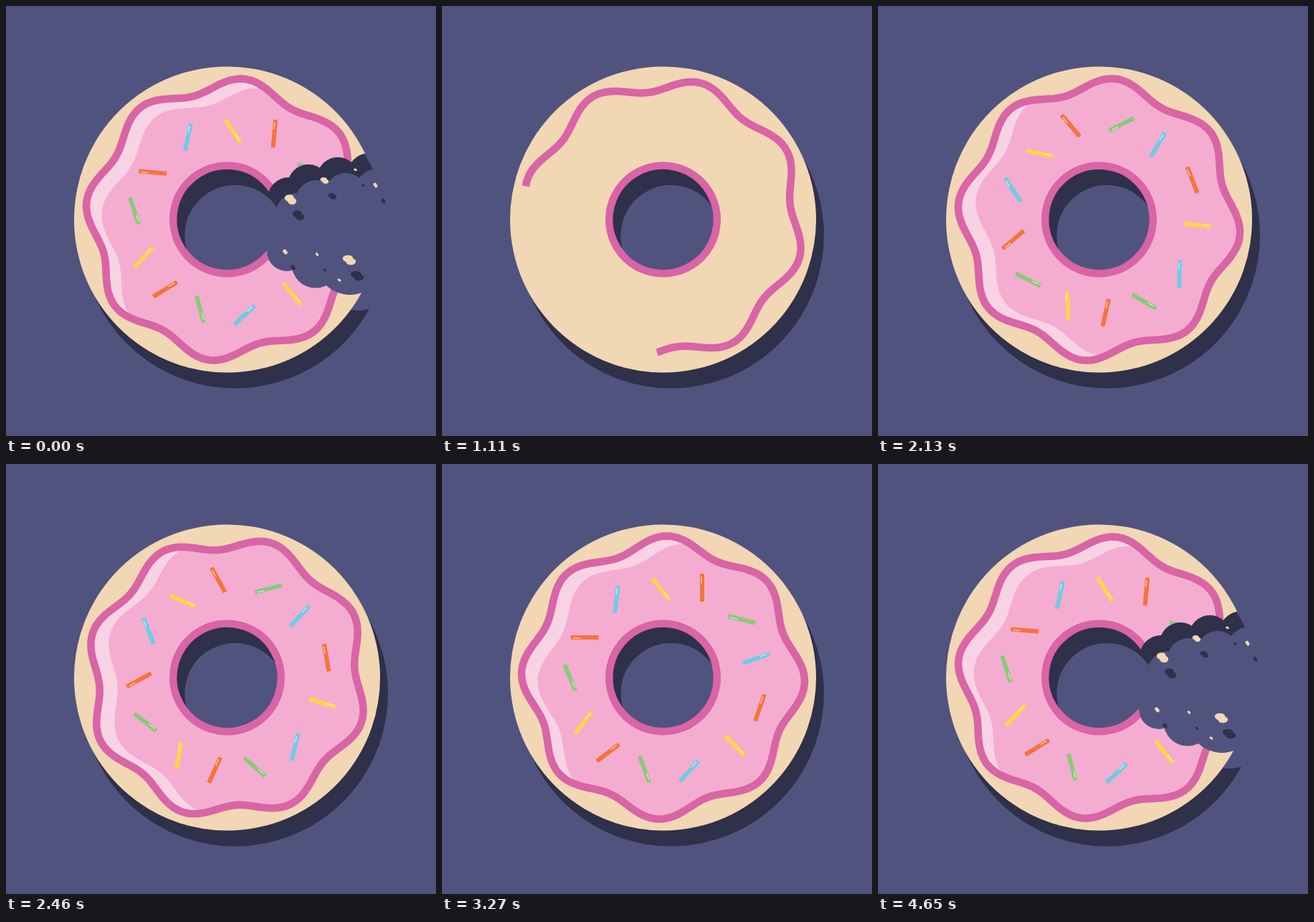
These frames come from a looping animation (600x600 px, 4.68 s). An HTML page:

```html
<!DOCTYPE html>
<html lang="en">
<head>
<meta charset="utf-8">
<title>Donut</title>
<style>
  html, body { margin: 0; width: 100%; height: 100%; overflow: hidden; background: #51537f; }
  svg { display: block; width: 100vw; height: 100vh; }
  #donut { filter: drop-shadow(11px 22px 0.6px #2f304a); }
  .line { fill: none; stroke: #d964a6; stroke-width: 10.5; }
</style>
</head>
<body>
<svg viewBox="0 0 600 600">
  <defs>
    <clipPath id="icingClip"><path id="icingShape"/></clipPath>
    <mask id="biteMask" maskUnits="userSpaceOnUse" x="0" y="0" width="600" height="600">
      <rect width="600" height="600" fill="#fff"/>
      <g id="bites"></g>
    </mask>
  </defs>
  <rect width="600" height="600" fill="#51537f"/>
  <g id="donut">
    <g mask="url(#biteMask)">
      <g transform="translate(308.5 298)">
        <circle id="dough" r="143.5" fill="none" stroke="#f2d7b4" stroke-width="140" pathLength="1" transform="rotate(-80.7)"/>
        <g id="icing">
          <g clip-path="url(#icingClip)">
            <circle id="fill" fill="none" stroke="#f4add0"/>
            <path id="shine" fill="#f8d3e4" fill-rule="evenodd"/>
          </g>
          <g id="sprinkles"></g>
          <path id="rim" class="line" pathLength="1"/>
          <circle id="hole" class="line" r="75.25" pathLength="1" transform="rotate(-90)"/>
        </g>
      </g>
    </g>
    <g id="crumbs" fill="#f2d7b4"></g>
  </g>
</svg>
<script>
const LOOP = 4680, STEP = 30;
const SPIN = 35.35, SPIN_END = 3420, SPIN_REF = 3270;
const $ = id => document.getElementById(id);
const RAD = Math.PI / 180;

function add(parent, tag, attrs) {
  const el = document.createElementNS("http://www.w3.org/2000/svg", tag);
  for (const key in attrs) el.setAttribute(key, attrs[key]);
  parent.appendChild(el);
  return el;
}

const phase = (t, from, to) => Math.min(1, Math.max(0, (t - from) / (to - from)));
const easeInOut = p => p * p * (3 - 2 * p);
const easeOut = p => 1 - (1 - p) ** 3;

// Eight-lobed icing outline, angles clockwise from the top
function wavy(dx = 0, dy = 0) {
  let d = "";
  for (let a = 0; a < 360; a += 1.5) {
    const r = 188 + 9.6 * Math.cos(8 * (a - 2) * RAD);
    const x = dx + r * Math.sin(a * RAD), y = dy - r * Math.cos(a * RAD);
    d += (a ? "L" : "M") + x.toFixed(2) + " " + y.toFixed(2);
  }
  return d + "Z";
}

const outline = wavy();
$("icingShape").setAttribute("d", outline);
$("rim").setAttribute("d", outline);

const ORANGE = "#f4743b", GREEN = "#8cc87a", BLUE = "#6fcbe4", YELLOW = "#fdd34c";
// x, y, direction of the glossy end, colour
const sprinkles = [
  [363, 172.5, -90, ORANGE], [418.5, 217, 194, GREEN], [438.5, 271.5, -19, BLUE],
  [443.5, 340, -71, ORANGE], [408.5, 393, 46, YELLOW], [345, 428.5, -48, BLUE],
  [282.5, 426, 70, GREEN], [231.5, 403, -37, ORANGE], [197.5, 361, -52, YELLOW],
  [178.5, 298, 67, GREEN], [199, 242, 180, ORANGE], [243.5, 188.5, -83, BLUE],
  [305, 174.5, 52, YELLOW]
].map(([x, y, dir, color]) => {
  const el = add($("sprinkles"), "g", {});
  add(el, "rect", { x: -19.5, y: -3, width: 39, height: 6, rx: 0.8, fill: color });
  add(el, "path", { d: "M6-1H16", stroke: "#fff", "stroke-opacity": 0.65, "stroke-width": 1.3 });
  return { el, place: `translate(${x - 308.5} ${y - 298}) rotate(${dir})` };
});

// Each bite: start time, body polygon, circles (x, y, r)
const bites = [
  [3480, "455,240 506,235 560,222 560,390 480,380 450,362", [[463, 240, 29], [506, 235, 29.5], [480, 355, 48]]],
  [3570, "415,250 470,240 485,360 425,360", [[422, 250, 29], [432, 360, 33.5]]],
  [3660, "367,262 430,250 445,360 392,350 366,335", [[395, 269, 30], [392, 342, 28]]]
].map(([start, points, circles]) => {
  const el = add($("bites"), "g", {});
  add(el, "polygon", { points });
  for (const [cx, cy, r] of circles) add(el, "circle", { cx, cy, r });
  return { el, start };
});

// x, y, half width, half height
const crumbs = [
  [397, 270, 8, 7], [444.5, 243.5, 5.8, 4.6], [479, 354.5, 9, 6.8], [515.5, 250, 3, 3.5],
  [487.5, 228.5, 2.5, 1.8], [389.5, 343, 3.5, 3.5], [434, 346.5, 2.2, 2.4], [465, 382.5, 2.6, 2]
].map(([x, y, w, h]) => {
  const el = add($("crumbs"), "path", {
    d: "M-1-.5Q-.7-1.1 0-.95Q.55-.9 .6-.3Q1.1 0 1 .45Q.8 1.05 .2 1Q-.35 .95-.5 .4Q-1.1 .1-1-.5Z"
  });
  return { el, x, y, w, h };
});

function show(el, on) {
  el.setAttribute("visibility", on ? "visible" : "hidden");
}

function trace(el, p) {
  show(el, p > 0);
  el.setAttribute("stroke-dasharray", p < 1 ? `${p} 2` : "none");
}

function draw(ms) {
  // The bitten donut is held over the start of the loop
  const t = ms < STEP ? ms + LOOP : ms;

  trace($("dough"), easeInOut(phase(t, 0, 480)));
  trace($("hole"), easeInOut(phase(t, 540, 960)));
  trace($("rim"), easeInOut(phase(t, 720, 1320)));

  const angle = SPIN * (Math.min(t, SPIN_END) - SPIN_REF) / 1000;
  $("icing").setAttribute("transform", `rotate(${angle.toFixed(3)})`);

  const grow = easeInOut(phase(t, 1290, 1770));
  const edge = 75 + 130 * grow;
  $("fill").setAttribute("r", (75 + edge) / 2);
  $("fill").setAttribute("stroke-width", edge - 75);

  const gloss = 25 * easeOut(phase(t, 1770, 2100));
  show($("shine"), gloss > 0);
  $("shine").setAttribute("d", outline + wavy(0.9 * gloss, 0.44 * gloss));

  sprinkles.forEach(({ el, place }, i) => {
    const start = 1680 + i * 22;
    const p = easeOut(phase(t, start, start + 150));
    show(el, p > 0);
    el.setAttribute("transform", `${place} scale(${p})`);
  });

  for (const { el, start } of bites) show(el, t >= start);

  const fly = easeOut(phase(t, 3480, 3750));
  for (const { el, x, y, w, h } of crumbs) {
    const cx = 450 + (x - 450) * fly, cy = 300 + (y - 300) * fly;
    show(el, fly > 0);
    el.setAttribute("transform", `translate(${cx} ${cy}) scale(${w} ${h})`);
  }
}

const begin = performance.now();
function tick() {
  const ms = (performance.now() - begin) % LOOP;
  draw(Math.floor(ms / STEP) * STEP);
  requestAnimationFrame(tick);
}
tick();
</script>
</body>
</html>
```
